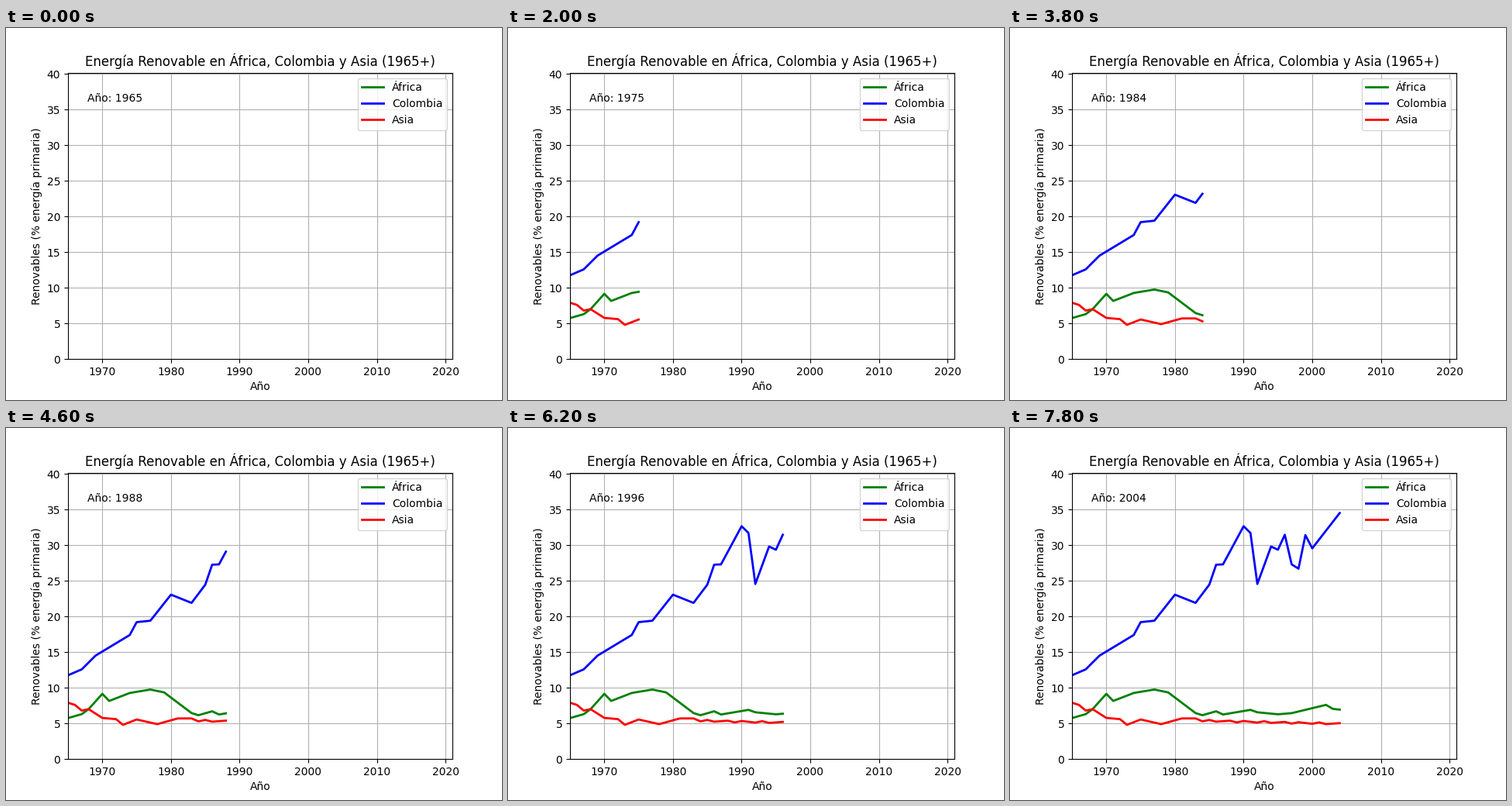
These frames come from a looping animation (640x480 px, 8000 ms). A matplotlib script:

```python
import matplotlib.pyplot as plt
import numpy as np
from matplotlib.animation import FuncAnimation

START, STEPS, STEP_MS = 1965, 40, 200
years = START + np.arange(STEPS)


def trend(*points):
    """Yearly values on straight runs between (years since START, value) turns."""
    x, y = zip(*points)
    return np.interp(years - START, x, y)


africa = trend((0, 5.75), (2, 6.3), (3, 7), (5, 9.15), (6, 8.15), (9, 9.27),
               (12, 9.75), (14, 9.35), (18, 6.45), (19, 6.15), (21, 6.7),
               (22, 6.25), (26, 6.9), (27, 6.56), (30, 6.28), (32, 6.44),
               (37, 7.6), (38, 7.04), (39, 6.93))

colombia = trend((0, 11.75), (2, 12.58), (4, 14.5), (9, 17.4), (10, 19.2),
                 (12, 19.4), (15, 23.05), (18, 21.9), (20, 24.45),
                 (21, 27.25), (22, 27.3), (25, 32.65), (26, 31.7),
                 (27, 24.55), (29, 29.8), (30, 29.35), (31, 31.45),
                 (32, 27.3), (33, 26.7), (34, 31.4), (35, 29.55), (39, 34.5))

# Asia settles into a slow decline with a small ripple.
asia = trend((0, 7.9), (1, 7.6), (2, 6.8), (3, 7), (5, 5.77), (7, 5.6),
             (8, 4.8), (10, 5.55), (13, 4.9), (16, 5.7), (18, 5.7),
             (19, 5.38), (39, 4.95))
asia += 0.13 * np.cos(2 * np.pi * (years - 1985) * 3 / 8) * (years > 1983)

SERIES = [("África", "green", africa),
          ("Colombia", "blue", colombia),
          ("Asia", "red", asia)]

fig, ax = plt.subplots(figsize=(6.4, 4.8), dpi=100)
ax.set_xlim(START, 2021)
ax.set_ylim(0, 40.16)
ax.set_title("Energía Renovable en África, Colombia y Asia (1965+)")
ax.set_xlabel("Año")
ax.set_ylabel("Renovables (% energía primaria)")
ax.grid(True)

lines = [ax.plot([], [], color=color, lw=2, label=name)[0]
         for name, color, _ in SERIES]
year_text = ax.text(0.05, 0.9, "", transform=ax.transAxes)
ax.legend(loc="upper right")


def update(i):
    # One point alone is no line, so the first step shows empty axes.
    n = i + 1 if i else 0
    for line, (_, _, values) in zip(lines, SERIES):
        line.set_data(years[:n], values[:n])
    year_text.set_text(f"Año: {years[i]}")
    return [*lines, year_text]


anim = FuncAnimation(fig, update, frames=STEPS, interval=STEP_MS,
                     init_func=lambda: update(0), repeat=True, repeat_delay=0)
plt.show()
```
